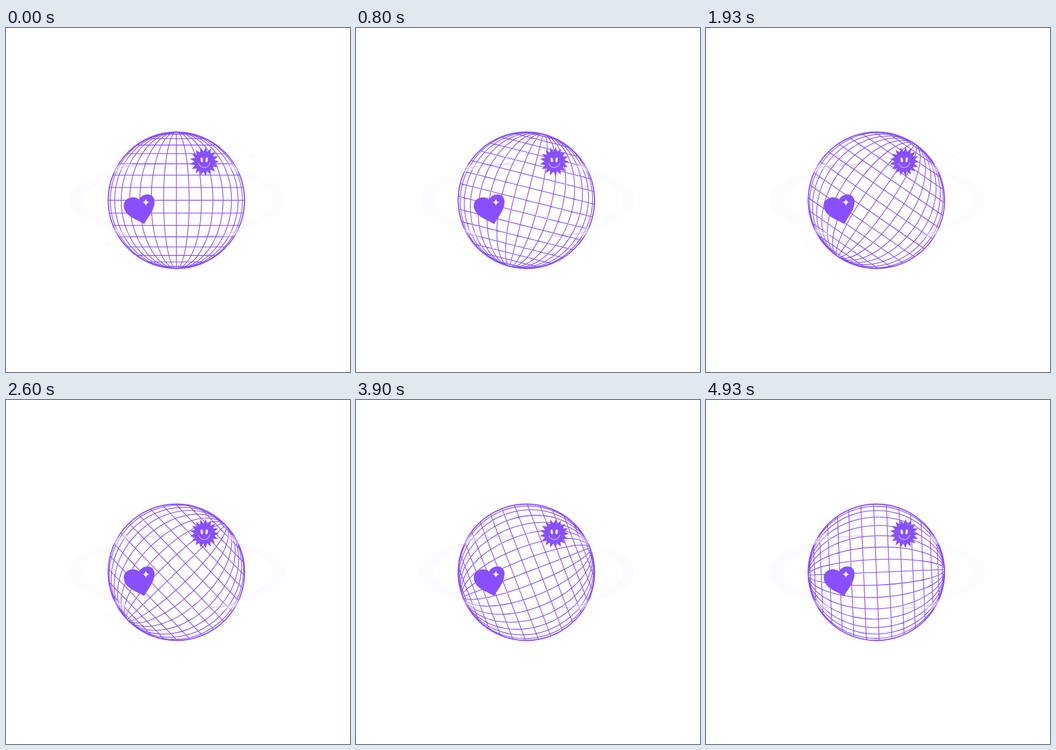
Write an HTML page that moves like this. It is 600 by 600 pixels and loops after 5.01 s.

```html
<!DOCTYPE html>
<html lang="en">
<head>
<meta charset="utf-8">
<title>Spinning globe</title>
<style>
  html, body { margin: 0; width: 100%; height: 100%; overflow: hidden; background: #fff; }
  svg { display: block; width: 100vw; height: 100vh; }
</style>
</head>
<body>
<svg viewBox="0 0 600 600">
  <defs>
    <filter id="soft" x="-30%" y="-30%" width="160%" height="160%"><feGaussianBlur stdDeviation="2.5"/></filter>
    <filter id="glow" x="-50%" y="-50%" width="200%" height="200%"><feGaussianBlur stdDeviation=".7"/></filter>
  </defs>

  <path fill="#fcfbff" fill-rule="evenodd"
    d="M109 300a189 64 0 1 0 378 0a189 64 0 1 0 -378 0zM136 300a165 54 0 1 0 330 0a165 54 0 1 0 -330 0z"/>
  <g fill="#fcfbff">
    <path d="M430 217q1 5 6 6q-5 1-6 6q-1-5-6-6q5-1 6-6z"/>
    <path d="M177 370q1 5 6 6q-5 1-6 6q-1-5-6-6q5-1 6-6z"/>
  </g>

  <path id="grid" fill="none" stroke="#884fff" stroke-width="1.3"/>
  <circle cx="297.200" cy="300.500" r="119" fill="none" stroke="#884fff" stroke-width="1.800"/>

  <!-- haze where the ring crosses the globe -->
  <g fill="none" stroke="#fff" stroke-width="7" stroke-opacity=".7" stroke-linecap="round" filter="url(#soft)">
    <path d="M190 248Q198 241 214 240M404 248Q398 241 390 240M192 353Q200 359 212 361M404 353Q398 359 384 361"/>
  </g>
  <g fill="none" stroke="#884fff" stroke-opacity=".22" stroke-width="2" filter="url(#glow)">
    <path d="M190 246Q215 238 275 237M388 237Q400 240 405 248M191 355Q200 361 214 363M345 363Q385 362 405 353"/>
  </g>

  <g fill="#884fff">
    <path d="M232 299C238 288 257 286 259 301C260 317 249 327 241 342C232 335 207 330 205.500 311C204 296 224 291 232 299Z"/>
    <path id="sun"/>
  </g>

  <g filter="url(#glow)">
    <circle cx="244" cy="304" r="3" fill="#fff" opacity=".4"/>
    <path fill="#fff" d="M244 297.500q.6 6 6.500 6.500q-5.900.5-6.500 6.500q-.6-6-6.500-6.500q5.900-.5 6.500-6.500z"/>
    <ellipse cx="341.500" cy="230" rx="2.100" ry="4.200" fill="#f1ebff" transform="rotate(-8 341.500 230)"/>
    <ellipse cx="350" cy="230" rx="2.100" ry="4.200" fill="#f1ebff" transform="rotate(8 350 230)"/>
    <path d="M336 236Q339 243.500 346 243.500Q353 243 356 235" fill="none" stroke="#c3a8ff" stroke-width="1.600"/>
  </g>
</svg>
<script>
const CX = 297.2, CY = 300.5, R = 119, STEP = 10.8 * Math.PI / 180;
const LOOP = 5010, FRAMES = 100, TURN = 88.5;
const grid = document.getElementById('grid');

const ellipse = rx => `M${CX} ${CY - R}A${rx} ${R} 0 0 1 ${CX} ${CY + R}A${rx} ${R} 0 0 1 ${CX} ${CY - R}`;
const parallel = (y, half) => `M${CX - half} ${CY + y}h${2 * half}`;

let lines = `M${CX} ${CY - R}v${2 * R}` + parallel(0, R);
for (let i = 1; i <= 8; i++) {
  const s = R * Math.sin(i * STEP), c = R * Math.cos(i * STEP);
  lines += ellipse(s) + parallel(s, c) + parallel(-s, c);
}
grid.setAttribute('d', lines);

// Sun rays alternate between a tip and a valley
const rays = 17;
let sun = '';
for (let i = 0; i < rays * 2; i++) {
  const a = i * Math.PI / rays - Math.PI / 2 + 0.1, r = i % 2 ? 17.5 : 25.5;
  sun += `${i ? 'L' : 'M'}${346 + r * Math.cos(a)} ${233 + r * Math.sin(a)}`;
}
document.getElementById('sun').setAttribute('d', sun + 'Z');

// Steps alternate between 30 and 70 ms while the grid turns in the plane
function draw(now) {
  const t = now % LOOP;
  const step = Math.min(FRAMES - 1, 2 * Math.floor(t / 100) + (t % 100 >= 30 ? 1 : 0));
  grid.setAttribute('transform', `rotate(${step * TURN / FRAMES} ${CX} ${CY})`);
  requestAnimationFrame(draw);
}
draw(0);
</script>
</body>
</html>
```
